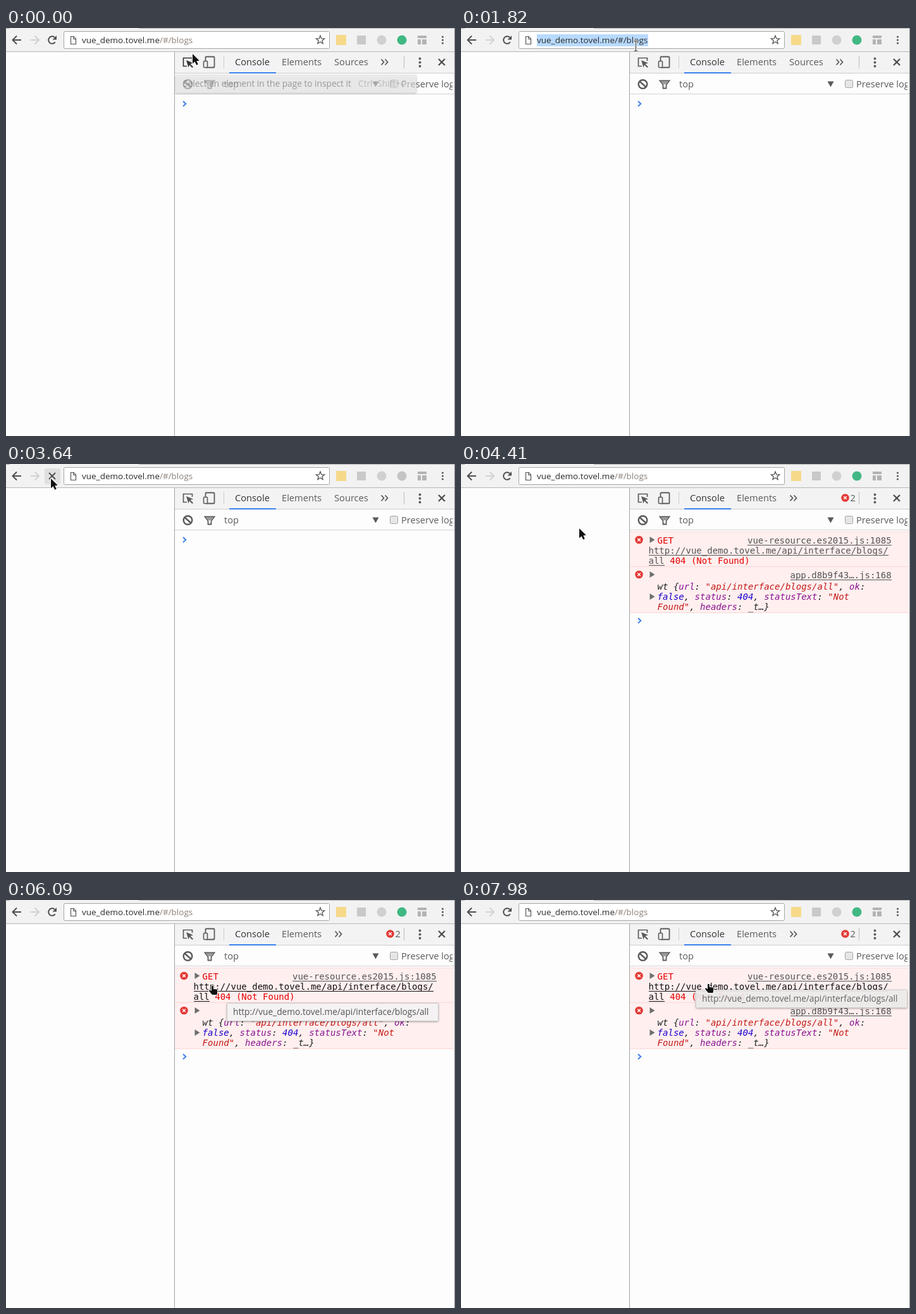
An HTML page with a canvas that plays this animation: 710 by 646 pixels, repeating every 8000 ms.

```html
<!DOCTYPE html>
<html lang="en">
<head>
<meta charset="utf-8">
<title>Browser console</title>
<style>
html, body { margin: 0; width: 100%; height: 100%; overflow: hidden; background: #fdfdfd; }
canvas { display: block; }
</style>
</head>
<body>
<canvas id="stage" width="710" height="646"></canvas>
<script>
const ctx = document.getElementById('stage').getContext('2d');
const LOOP = 8000, STEP = 70;
const HOST = 'vue_demo.tovel.me';
const API = 'http://' + HOST + '/api/interface/blogs/';

const ui = size => size + 'px "Open Sans", "Noto Sans", sans-serif';
const UI = ui(14.67), SMALL = ui(13.7), URL_FONT = ui(13.5);
const MONO = '14px "DejaVu Sans Mono", monospace';
const INK = '#5a5a5a', RED = '#e60000', LINK = '#545454';
const KEY = '#881391', STR = '#c41a16', NUM = '#1c00cf', TEXT = '#222';

// Pointer path: time, x, y, shape
const ARROW = 0, BEAM = 1, HAND = 2;
const PATH = [
  [0, 295, 41, ARROW], [140, 322, 28, BEAM], [280, 341, 13, BEAM], [350, 341, 13, BEAM],
  [560, 330, 18, BEAM], [1190, 330, 18, BEAM], [1260, 315, 14, BEAM], [1470, 211, 30, ARROW],
  [1540, 211, 30, ARROW], [1610, 226, 26, BEAM], [1960, 309, 30, ARROW], [2100, 309, 30, ARROW],
  [2240, 270, 22, BEAM], [2450, 130, 23, BEAM], [2520, 95, 27, ARROW], [2590, 76, 30, ARROW],
  [2660, 76, 30, ARROW], [2800, 71, 23, ARROW], [4200, 71, 23, ARROW], [4410, 187, 102, ARROW],
  [4620, 224, 130, ARROW], [4760, 224, 130, ARROW], [5180, 298, 192, ARROW],
  [5390, 339, 197, ARROW], [5600, 335, 144, ARROW], [5670, 327, 137, HAND],
  [6020, 327, 137, HAND], [6090, 325, 136, HAND], [7000, 325, 136, HAND],
  [7070, 352, 124, ARROW], [7210, 397, 107, ARROW], [7420, 408, 74, ARROW],
  [7560, 406, 78, ARROW], [7840, 394, 121, ARROW], [7910, 390, 133, HAND], [8000, 390, 133, HAND]
];

const clamp = v => Math.max(0, Math.min(1, v));

function pointer(t) {
  let i = 0;
  while (i < PATH.length - 2 && t >= PATH[i + 1][0]) i++;
  const a = PATH[i], b = PATH[i + 1], k = clamp((t - a[0]) / (b[0] - a[0]));
  return { x: Math.round(a[1] + (b[1] - a[1]) * k), y: Math.round(a[2] + (b[2] - a[2]) * k), shape: a[3] };
}

function rect(x, y, w, h, color) {
  ctx.fillStyle = color;
  ctx.fillRect(x, y, w, h);
}

function disc(x, y, r, color) {
  ctx.fillStyle = color;
  ctx.beginPath();
  ctx.arc(x, y, r, 0, 7);
  ctx.fill();
}

function trace(points, closed) {
  ctx.beginPath();
  for (let i = 0; i < points.length; i += 2) ctx.lineTo(points[i], points[i + 1]);
  if (closed) ctx.closePath();
}

function line(points, color, width = 1, closed = false) {
  trace(points, closed);
  ctx.strokeStyle = color;
  ctx.lineWidth = width;
  ctx.stroke();
}

function poly(points, color) {
  trace(points, true);
  ctx.fillStyle = color;
  ctx.fill();
}

function ring(x, y, r, color, width, from = 0, to = 7) {
  ctx.beginPath();
  ctx.arc(x, y, r, from, to);
  ctx.strokeStyle = color;
  ctx.lineWidth = width;
  ctx.stroke();
}

function box(x, y, w, h, r, fill, stroke, width = 1) {
  ctx.beginPath();
  ctx.roundRect(x, y, w, h, r);
  if (fill) { ctx.fillStyle = fill; ctx.fill(); }
  if (stroke) { ctx.strokeStyle = stroke; ctx.lineWidth = width; ctx.stroke(); }
}

function text(str, x, y, color, font) {
  ctx.font = font;
  ctx.fillStyle = color;
  ctx.fillText(str, x, y);
  return x + ctx.measureText(str).width;
}

function link(str, x, y, color) {
  const end = text(str, x, y, color, MONO);
  rect(Math.round(x), y + 2, Math.round(end - x), 1, color);
  return end;
}

function runs(x, y, ...parts) {
  for (const [str, color] of parts) x = text(str, x, y, color, 'italic ' + MONO);
}

function cross(x, y, r, color, width) {
  line([x - r, y - r, x + r, y + r], color, width);
  line([x - r, y + r, x + r, y - r], color, width);
}

function dots(x, y, gap, r) {
  for (const i of [-1, 0, 1]) disc(x, y + i * gap, r, INK);
}

function chevrons(x, y) {
  for (const dx of [0, 6]) line([x + dx, y - 4.5, x + dx + 4, y, x + dx, y + 4.5], INK, 1.8);
}

function badge(x, y) {
  disc(x, y, 6.3, '#e33a36');
  cross(x, y, 2.3, '#fff', 1.5);
}

function reloadIcon() {
  ring(73, 19, 5.8, '#4d4d4d', 2, 0.6, 5.5);
  poly([80, 12, 80, 18.5, 73.5, 18.5], '#4d4d4d');
}

function star(x, y) {
  const pts = [];
  for (let i = 0; i < 10; i++) {
    const a = i * Math.PI / 5 - Math.PI / 2, r = i % 2 ? 3 : 7;
    pts.push(x + r * Math.cos(a), y + r * Math.sin(a));
  }
  line(pts, '#555', 1.3, true);
}

function browserBar(t) {
  const loading = t >= 3360 && t < 3710;
  rect(0, 0, 710, 37, '#f2f2f2');
  rect(0, 0, 6, 1, '#aaa');
  rect(210, 0, 500, 1, '#b4b4b4');
  rect(0, 37, 710, 1, '#b5b5b5');

  line([24, 19, 11, 19], '#4d4d4d', 2);
  line([17, 12.5, 10.5, 19, 17, 25.5], '#4d4d4d', 2);
  line([39, 19, 51, 19], '#d2d2d2', 2);
  line([45.5, 12.5, 52, 19, 45.5, 25.5], '#d2d2d2', 2);

  if (t >= 2590 && t < 3710) box(61, 7, 25, 25, 3, '#e0e0e0');
  if (loading) cross(73, 19, 5, '#4d4d4d', 2);
  else reloadIcon();

  box(91.5, 5.5, 420, 27, 2, '#fff', '#a6a6a6');
  line([102.5, 13.5, 107, 13.5, 110.5, 17, 110.5, 25.5, 102.5, 25.5], '#555', 1.2, true);
  line([106.5, 13.5, 106.5, 17.5, 110.5, 17.5], '#555');

  const selected = t >= 1050 && t < 3360;
  if (selected) rect(120, 10, 176, 19, '#b8daff');
  const end = text(HOST, 120, 24, '#2b2b2b', URL_FONT);
  text('/#/blogs', end, 24, selected ? '#2b2b2b' : '#8c8078', URL_FONT);
  if (t >= 910 && t < 1050) rect(296, 10, 1, 19, '#222');
  star(497, 19);

  rect(522, 11, 16, 16, '#f7d98a');
  rect(555, 12, 14, 14, '#c9c9c9');
  disc(594, 19, 7.5, '#d0d0d0');
  disc(626, 19, 7.5, t >= 3360 && t < 3920 ? '#c4c4c4' : '#41b883');
  rect(651, 12, 14, 4, '#b3b3b3');
  rect(651, 18, 5, 8, '#b3b3b3');
  rect(658, 18, 7, 8, '#b3b3b3');
  dots(690.5, 19, 5, 1.6);
}

function devtoolsBar(t, failed) {
  rect(267, 38, 442, 33, '#f3f3f3');
  rect(267, 71, 442, 1, '#cdcdcd');
  rect(267, 104, 442, 1, '#d4d4d4');

  const inspect = t < 70 ? '#333' : INK;
  line([286, 60.5, 280.5, 60.5, 280.5, 47.5, 294.5, 47.5, 294.5, 52], inspect, 1.7);
  poly([285, 51, 296, 55.5, 291.5, 57, 296, 61.5, 294.5, 63, 290, 58.5, 288.5, 62.5], inspect);
  box(315.5, 45.5, 14, 17, 1, null, INK, 1.8);
  box(312.5, 52.5, 6, 10, 1, '#f3f3f3', INK, 1.6);
  rect(344, 44, 1, 20, '#ccc');

  text('Console', 362, 59, '#333', UI);
  text('Elements', 436, 59, INK, UI);
  if (failed) {
    chevrons(520.5, 54);
    badge(607.5, 53.5);
    text('2', 615.5, 59, INK, UI);
  } else {
    text('Sources', 519, 59, INK, UI);
    chevrons(593.5, 54);
  }
  rect(353, 70, 74, 2, '#3b82ee');
  rect(629, 44, 1, 20, '#bbb');
  dots(654.5, 54.5, 6, 1.9);
  cross(689, 54, 5, '#4d4d4d', 2.3);

  ring(287.5, 89, 6.8, INK, 2.4);
  line([282.5, 84.5, 292.5, 93.5], INK, 2.4);
  line([314.5, 83.5, 329.5, 83.5, 324.5, 90, 324.5, 95.5, 319.5, 95.5, 319.5, 90], INK, 1.8, true);
  poly([316, 84, 328, 84, 324, 89, 320, 89], '#999');
  text('top', 345, 94, INK, UI);
  poly([579.5, 84.5, 589.5, 84.5, 584.5, 93.5], INK);
  box(607.5, 82.5, 12, 12, 2, '#e6e6e6', '#a3a3a3');
  ctx.save();
  ctx.beginPath();
  ctx.rect(600, 74, 106, 28);
  ctx.clip();
  text('Preserve log', 625, 94, INK, UI);
  ctx.restore();
}

function prompt(y) {
  line([280, y - 4, 284.3, y, 280, y + 4], '#3f80ea', 2);
}

function errors(hover) {
  rect(267, 107, 441, 129, '#ffefef');
  for (const y of [107, 162, 235]) rect(267, y, 441, 1, '#fbd6d6');
  for (const y of [120, 175]) badge(281.5, y);
  for (const y of [120, 175, 210]) poly([298.5, y - 5, 306.5, y, 298.5, y + 5], '#6e6e6e');

  const tint = hover ? '#111' : LINK;
  text('GET', 310.6, 126, RED, MONO);
  link('vue-resource.es2015.js:1085', 453, 126, LINK);
  link(API, 296.5, 142, tint);
  const end = link('all', 296.5, 158, tint);
  text(' 404 (Not Found)', end, 158, RED, MONO);

  link('app.d8b9f43….js:168', 520.5, 181, LINK);
  runs(310.6, 199, ['wt {', TEXT], ['url', KEY], [': ', TEXT],
    ['"api/interface/blogs/all"', STR], [', ', TEXT], ['ok', KEY], [':', TEXT]);
  runs(310.6, 215, ['false', NUM], [', ', TEXT], ['status', KEY], [': ', TEXT], ['404', NUM],
    [', ', TEXT], ['statusText', KEY], [': ', TEXT], ['"Not', STR]);
  runs(310.6, 231, ['Found"', STR], [', ', TEXT], ['headers', KEY], [': _t…}', TEXT]);
}

function tip(x, y, w, alpha, fill, label, labelX, shortcut) {
  if (alpha <= 0) return;
  ctx.save();
  ctx.globalAlpha = alpha;
  ctx.shadowColor = 'rgba(0,0,0,.35)';
  ctx.shadowBlur = 3;
  ctx.shadowOffsetY = 1;
  box(x, y, w, 29, 2, fill);
  ctx.shadowColor = 'transparent';
  box(x + 0.5, y + 0.5, w - 1, 28, 2, null, '#ccc');
  text(label, labelX, y + 19, '#555', SMALL);
  if (shortcut) text(shortcut, 557, y + 19, '#999', SMALL);
  ctx.restore();
}

function tips(t) {
  tip(268, 74, 381, 0.55 * clamp(1 - t / 280), '#fff',
    'Select an element in the page to inspect it', 280, 'Ctrl+Shift+C');
  if (t >= 5670 && t < 7070)
    tip(349, 163, 335, clamp((t - 5670) / 210), '#f4f2f2', API + 'all', 359);
  if (t >= 7910)
    tip(371, 142, 335, t < 7980 ? 0.5 : 0.9, '#f4f2f2', API + 'all', 381);
}

function drawPointer({ x, y, shape }) {
  ctx.save();
  ctx.translate(x, y);
  ctx.lineJoin = 'round';
  if (shape === ARROW) {
    const pts = [0, 0, 0, 15.5, 3.6, 12.2, 6.2, 17.8, 8.8, 16.6, 6.3, 11.2, 10.8, 10.8];
    line(pts, '#fff', 2, true);
    poly(pts, '#111');
  } else if (shape === BEAM) {
    for (const [color, w] of [['#fff', 3], ['#222', 1]]) {
      line([0.5, -7, 0.5, 8], color, w);
      line([-2.5, -7.5, 3.5, -7.5], color, w);
      line([-2.5, 8.5, 3.5, 8.5], color, w);
    }
  } else {
    const pts = [0, 0, 2.5, 0, 3, 5, 8.5, 5.5, 9.5, 8, 8.5, 14, 1, 14, -4, 8, -3, 6, 0, 8];
    line(pts, '#fff', 2, true);
    poly(pts, '#111');
  }
  ctx.restore();
}

function draw(t) {
  const failed = t >= 3920;
  const hover = (t >= 5670 && t < 7070) || t >= 7910;
  rect(0, 0, 710, 646, '#fdfdfd');
  browserBar(t);
  devtoolsBar(t, failed);
  if (failed) errors(hover);
  prompt(failed ? 248 : 120);
  rect(266, 38, 1, 608, '#a3a3a3');
  rect(709, 0, 1, 646, '#8c8c8c');
  tips(t);
  drawPointer(pointer(t));
}

const start = performance.now();
function frame() {
  const t = Math.max(0, performance.now() - start) % LOOP;
  draw(Math.floor(t / STEP) * STEP);
  requestAnimationFrame(frame);
}
frame();
</script>
</body>
</html>
```
